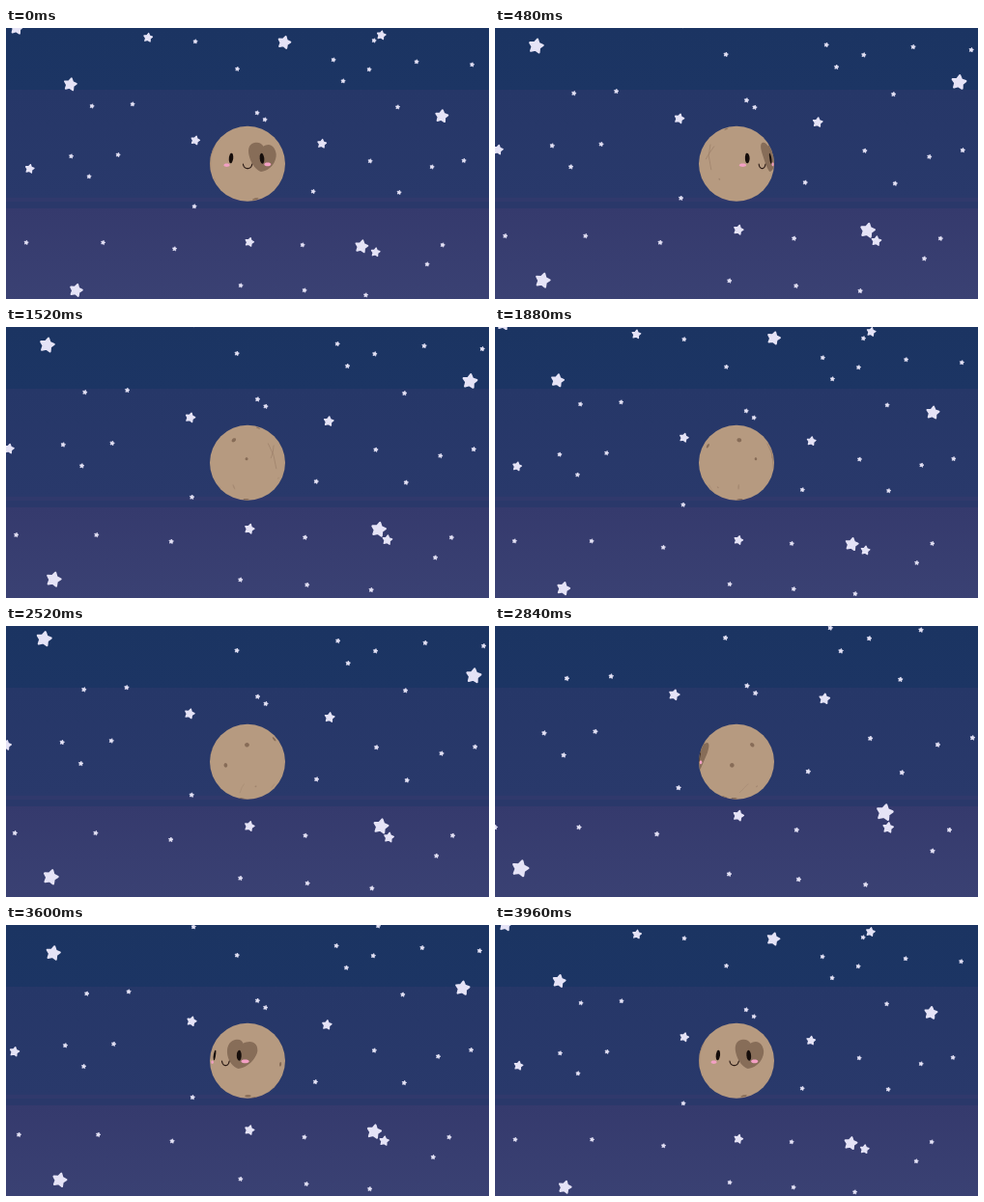
An HTML page with a canvas for the animation above (4 s loop, 500 by 281 pixels).

```html
<!DOCTYPE html>
<html lang="en">
<head>
<meta charset="utf-8">
<title>Little planet</title>
<style>
  html, body { margin: 0; width: 100%; height: 100%; overflow: hidden; background: #27376a; }
  canvas { display: block; width: 100%; height: 100%; }
</style>
</head>
<body>
<canvas id="stage"></canvas>
<script>
const W = 500, H = 281, LOOP = 4000, TAU = Math.PI * 2;
const canvas = document.getElementById('stage');
const ctx = canvas.getContext('2d');
const density = window.devicePixelRatio || 1;
canvas.width = W * density;
canvas.height = H * density;
ctx.scale(density, density);

// Each star layer zooms around its own point by `grow` and back.
const layers = [
  { size: 2.7, grow: 0.097, cx: 250, cy: 374, stars: [
    [196, 14], [239.5, 42.5], [339, 33], [349, 55], [376, 43], [381, 13], [425, 35], [482.5, 38],
    [89, 81], [131, 79], [260, 88], [268, 95], [405.5, 82], [67.5, 133], [116, 131.5], [86, 154],
    [377, 138], [441, 144], [474, 137.5], [407, 170.5], [318, 169.5], [195, 185], [21, 222.5],
    [100.5, 222.5], [174.5, 229], [307, 225], [452, 225], [436, 245], [243, 267], [309, 272], [372.5, 277]] },
  { size: 5.2, grow: 0.2, cx: 252, cy: 357, stars: [
    [147, 10], [388.5, 7.5], [196, 116.5], [327, 120], [24.5, 146], [252, 222], [382.5, 232.5]] },
  { size: 7.4, grow: 0.295, cx: 240, cy: 346, stars: [
    [11, 0], [66.5, 58.5], [288, 15], [451, 91.5], [368, 226.5], [72.5, 272]] }
];

function drawStar(x, y, r, tilt) {
  ctx.beginPath();
  for (let i = 0; i < 10; i++) {
    const a = tilt - Math.PI / 2 + i * Math.PI / 5;
    const d = r * (i % 2 ? 0.47 : 0.86);
    ctx.lineTo(x + d * Math.cos(a), y + d * Math.sin(a));
  }
  ctx.closePath();
  ctx.lineWidth = r * 0.26;
  ctx.fill();
  ctx.stroke();
}

function drawSky(t) {
  const sky = ctx.createLinearGradient(0, 0, 0, H);
  [[0, '#1b3462'], [64, '#1c3564'], [64, '#263768'], [176, '#29396b'], [176, '#30396c'],
   [180, '#30396c'], [180, '#2a386a'], [187, '#2a386a'], [187, '#353a6d'], [281, '#3a4173']]
    .forEach(([y, color]) => sky.addColorStop(y / H, color));
  ctx.fillStyle = sky;
  ctx.fillRect(0, 0, W, H);

  const zoom = (1 - Math.cos(t / LOOP * 2 * TAU)) / 2;
  ctx.fillStyle = ctx.strokeStyle = '#e5e3f6';
  ctx.lineJoin = 'round';
  for (const { size, grow, cx, cy, stars } of layers) {
    const k = 1 + grow * zoom;
    stars.forEach(([x, y], i) =>
      drawStar(cx + (x - cx) * k, cy + (y - cy) * k, size * k, 0.2 + 0.06 * (i % 3 - 1)));
  }
}

const planet = { x: 250, y: 140.8, r: 39 };

function ellipse(x, y, rx, ry, tilt = 0) {
  return Array.from({ length: 20 }, (_, i) => {
    const u = rx * Math.cos(i / 20 * TAU), v = ry * Math.sin(i / 20 * TAU);
    return [x + u * Math.cos(tilt) - v * Math.sin(tilt), y + u * Math.sin(tilt) + v * Math.cos(tilt)];
  });
}

function bezier(p, a, b, q) {
  return Array.from({ length: 12 }, (_, i) => {
    const s = i / 11, m = 1 - s;
    return [0, 1].map(n => m ** 3 * p[n] + 3 * m * m * s * a[n] + 3 * m * s * s * b[n] + s ** 3 * q[n]);
  });
}

// Surface marks are drawn as seen head-on, relative to the planet's centre, then turned to a longitude.
const spot = (lon, y, rx, ry = rx, fill = '#876c57') => ({ lon, fill, points: ellipse(0, y, rx, ry) });
const line = (lon, points, stroke = '#9c8069', width = 0.7) => ({ lon, stroke, width, points });
const face = (fill, points) => ({ lon: 0, fill, points });

const marks = [
  spot(196, -23.5, 2.4, 2.1), spot(132.3, -17.5, 2.4, 2.2), spot(-138.2, -4, 1.5), spot(97.5, 3.6, 2.3),
  spot(-89, -36, 1.6, 1), spot(-73, 16, 1, 1, '#a0846d'),
  spot(38, 36.5, 3.2, 1.2), spot(88, 38, 3, 0.9), spot(-146, 38, 3, 0.9),
  spot(150, 25.5, 1, 0.9, '#a0846d'), spot(195, 25, 0.9, 2.8, '#a78b73'),
  line(-92, [[-3, -20], [0, -8], [4, 6]]),
  line(-92, [[4, -18], [0, -11], [-4, -5]]),
  line(123, [[2, 23], [-1, 27], [-4, 32]], '#a78b73'),
  face('#876d58', [
    ...bezier([16.5, -18], [12, -25], [1, -23], [1, -13.5]),
    ...bezier([1, -13.5], [1, -5], [7, 6], [14, 8.3]),
    ...bezier([14, 8.3], [23, 7], [30, -1], [29.7, -10]),
    ...bezier([29.7, -10], [28, -21], [20, -21], [16.5, -18])]),
  face('#f3a0c4', ellipse(-21.5, 1.4, 3.1, 1.7)),
  face('#f3a0c4', ellipse(20.8, 0.6, 3.5, 1.9)),
  face('#150d0b', ellipse(-17, -5.8, 2.2, 5.4, 0.1)),
  face('#150d0b', ellipse(15, -5.5, 2.3, 5.5, -0.1)),
  line(0, bezier([-4.6, 0.2], [-4, 6.4], [4.2, 6.4], [4.8, 0.2]), '#2b1b15', 1.1)
];

function drawMark({ lon, points, fill, stroke, width }, turn) {
  let visible = false;
  const quarter = Math.PI / 2;
  const seen = points.map(([x, y]) => {
    const ring = Math.sqrt(Math.max(1, planet.r ** 2 - y * y));
    let a = Math.asin(Math.max(-1, Math.min(1, x / ring))) + lon * TAU / 360 + turn;
    a = Math.atan2(Math.sin(a), Math.cos(a));
    if (Math.abs(a) < quarter) visible = true;
    a = Math.max(-quarter, Math.min(quarter, a));
    return [planet.x + ring * Math.sin(a), planet.y + y];
  });
  if (!visible) return;
  ctx.beginPath();
  seen.forEach(([x, y]) => ctx.lineTo(x, y));
  if (fill) {
    ctx.fillStyle = fill;
    ctx.fill();
  } else {
    ctx.strokeStyle = stroke;
    ctx.lineWidth = width;
    ctx.lineCap = 'round';
    ctx.stroke();
  }
}

function drawPlanet(t) {
  ctx.save();
  ctx.beginPath();
  ctx.arc(planet.x, planet.y, planet.r, 0, TAU);
  ctx.fillStyle = '#b69a80';
  ctx.fill();
  ctx.clip();
  marks.forEach(mark => drawMark(mark, t / LOOP * TAU));
  ctx.restore();
}

const start = performance.now();
function frame() {
  // The picture advances in 40 ms steps.
  const t = Math.floor((performance.now() - start) % LOOP / 40) * 40;
  drawSky(t);
  drawPlanet(t);
  requestAnimationFrame(frame);
}
frame();
</script>
</body>
</html>
```
